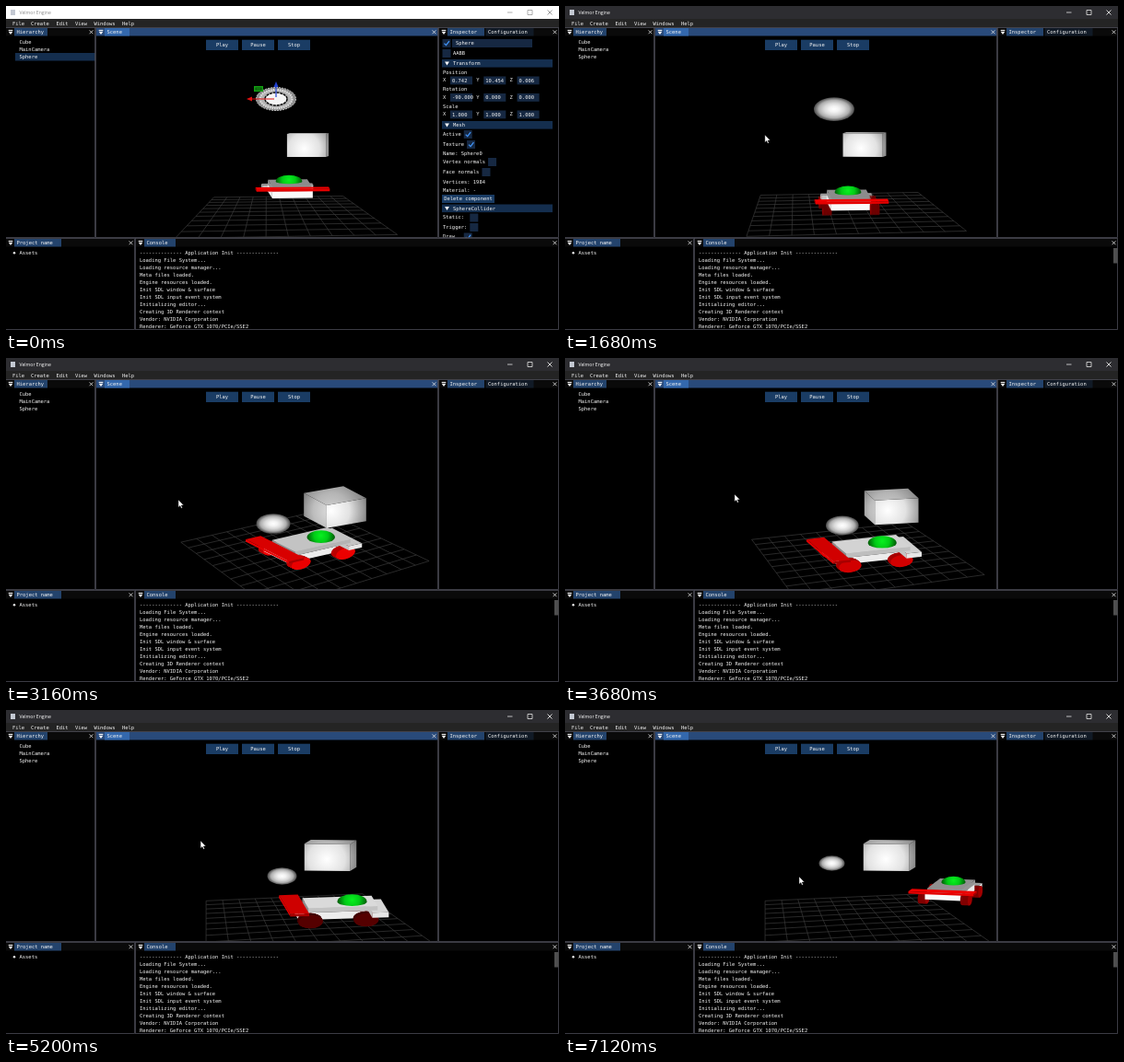
Write an HTML page with a canvas that moves like this. It is 600 by 352 pixels and loops after 7.16 s.

```html
<!DOCTYPE html>
<html lang="en">
<head>
<meta charset="utf-8">
<title>Velmor Engine</title>
<style>
html, body { margin: 0; width: 100%; height: 100%; overflow: hidden; background: #000; }
svg, canvas { position: absolute; left: 0; top: 0; width: 600px; height: 352px; }
text { font: 5.46px "DejaVu Sans Mono", monospace; fill: #f4f4f4; white-space: pre; }
.sans { font: 5.1px "Open Sans", sans-serif; }
</style>
</head>
<body>
<svg id="ui" viewBox="0 0 600 352"></svg>
<canvas id="view"></canvas>
<script>
const LOOP = 7160, FOCUS = 640, PLAY = 1000;
const BUTTON = '#1a3c64', HEADER = '#142e4e', FIELD = '#162842';

// ---------- editor panels ----------
const box = (x, y, w, h, c) => `<rect x="${x}" y="${y}" width="${w}" height="${h}" fill="${c}"/>`;
const line = (d, c, w = 0.8) => `<path d="${d}" fill="none" stroke="${c}" stroke-width="${w}"/>`;
const label = (x, mid, s, extra = '') => `<text x="${x}" y="${mid + 1.9}" ${extra}>${s}</text>`;
const centred = (x, mid, s) => label(x, mid, s, 'text-anchor="middle"');
const cross = (x, y, r = 1.9, c = '#eee') =>
  line(`M${x - r} ${y - r}l${2 * r} ${2 * r}m0 ${-2 * r}l${-2 * r} ${2 * r}`, c);
const arrow = (x, y) => `<path d="M${x - 2.4} ${y - 1.6}h4.8l-2.4 4z" fill="#fff"/>`;
const dock = (x, y) => box(x - 2.3, y - 2.6, 4.6, 1, '#fff') +
  `<path d="M${x - 2.3} ${y - 0.8}h4.6l-2.3 3.2z" fill="#fff"/>`;
const button = (x, y, w, h, s) => box(x, y, w, h, BUTTON) + centred(x + w / 2, y + h / 2, s);
const check = (x, y, on) => box(x, y, 9, 9, FIELD) +
  (on ? line(`M${x + 2} ${y + 4.6}l2 2l3.4 -4.4`, '#4296fa', 1.3) : '');
const header = (y, s) => box(473, y, 120, 8.6, HEADER) + arrow(478.5, y + 4) + label(485, y + 4.3, s);
const option = (mid, s, on) =>
  label(474, mid, s) + check(477 + s.length * 3.29, mid - 4, on);

function titleBar(bg, fg) {
  return box(0, 0, 600, 14, bg) + box(5, 4, 5, 6, '#c3c8d2') +
    `<text class="sans" x="14.5" y="9" style="fill:${fg}">Velmor Engine</text>` +
    line('M544 7h5.5M566 4.5h5v5h-5z', fg, 0.7) + cross(590, 7, 2.5, fg);
}

function panel(x, y, w, h, tab, tabW, bar = '#0a0a0a', tabColor = '#23436c') {
  return box(x, y, w, 8.5, bar) + box(x + 9, y, tabW, 8.5, tabColor) +
    dock(x + 5, y + 4.5) + label(x + 11.5, y + 4.3, tab) + cross(x + w - 4.5, y + 4.3) +
    `<rect x="${x - 0.5}" y="${y - 0.5}" width="${w}" height="${h}" fill="none" stroke="#4a4a54" stroke-width=".8"/>`;
}

function vector(y, name, values) {
  return label(474, y - 9, name) + values.map((v, i) => {
    const x = 474 + i * 36.3;
    return label(x, y - 0.5, 'XYZ'[i]) + box(x + 8, y - 4.5, 24, 8.8, FIELD) + label(x + 10, y, v);
  }).join('');
}

const log = `-------------- Application Init --------------
Loading File System...
Loading resource manager...
Meta files loaded.
Engine resources loaded.
Init SDL window &amp; surface
Init SDL input event system
Initializing editor...
Creating 3D Renderer context
Vendor: NVIDIA Corporation
Renderer: GeForce GTX 1070/PCIe/SSE2`.split('\n');

const inspector = check(473.5, 36, true) + box(484, 36, 87, 9, FIELD) + label(488, 40.5, 'Sphere') +
  check(473.5, 47, false) + label(485, 51.5, 'AABB') +
  header(58, 'Transform') +
  vector(81, 'Position', ['0.742', '10.454', '0.006']) +
  vector(99.5, 'Rotation', ['-90.000', '0.000', '0.000']) +
  vector(118, 'Scale', ['1.000', '1.000', '1.000']) +
  header(125, 'Mesh') +
  option(139, 'Active', true) + option(150, 'Texture', true) +
  label(474, 160, 'Name: Sphere0') +
  option(169, 'Vertex normals', false) + option(180, 'Face normals', false) +
  label(474, 191, 'Vertices: 1984') + label(474, 200, 'Material: -') +
  button(473, 205, 57, 9, 'Delete component') +
  header(215.5, 'SphereCollider') +
  option(229.5, 'Static: ', false) + option(240, 'Trigger:', false) + option(250.5, 'Draw  ', true) +
  box(471, 251.8, 128, 1.5, '#000');

document.getElementById('ui').innerHTML = box(0, 0, 600, 352, '#000') +
  `<g id="active">${titleBar('#2d2d31', '#fff')}</g><g id="idle">${titleBar('#fff', '#8a8a8a')}</g>` +
  box(0, 14, 600, 10, '#242424') +
  [[7, 'File'], [27, 'Create'], [54.5, 'Edit'], [75, 'View'], [95.5, 'Windows'], [126, 'Help']]
    .map(([x, s]) => label(x, 19, s)).join('') +
  `<g id="info">${inspector}${box(10, 51, 87, 8.5, HEADER)}</g>` +
  panel(0, 24, 97, 228, 'Hierarchy', 36) +
  panel(98, 24, 371, 228, 'Scene', 27, '#294a7a', '#3368ad') +
  panel(470, 24, 130, 228, 'Inspector', 40) +
  box(520.5, 24, 52, 8.5, '#111a26') + label(523, 28.3, 'Configuration') +
  panel(0, 253, 140, 99, 'Project name', 51) +
  panel(141, 253, 459, 99, 'Console', 34) +
  ['Cube', 'MainCamera', 'Sphere'].map((s, i) => label(14.5, 39.5 + i * 8, s)).join('') +
  '<circle cx="9" cy="268.3" r="1.2" fill="#fff"/>' + label(14.5, 268.3, 'Assets') +
  ['Play', 'Pause', 'Stop'].map((s, i) => button(217 + i * 39, 36.7, 35, 11.3, s)).join('') +
  log.map((s, i) => label(145, 268.4 + i * 8, s)).join('') +
  `<g id="thumb">${box(595, 263, 4.5, 16.5, '#4f4f4f')}</g>`;

// ---------- motion ----------
const clamp = v => Math.min(1, Math.max(0, v));
const mix = (a, b, k) => a + (b - a) * k;
const span = (t, from, to) => clamp((t - from) / (to - from));

// The camera rests in five poses; each swing between two of them has a start and an end.
const SWINGS = [[1000, 1640], [2560, 3160], [3160, 4360], [4360, 5100]];
const GRID = {
  x: [300, 307, 320, 320, 321], y: [223, 222, 210, 221.5, 226.5], size: [.87, .98, .95, .97, 1],
  yaw: [3, 5.5, 34, 2.5, 11], tilt: [.385, .36, .66, .43, .465], depth: [.0048, .003, .0027, .002, .0036]
};
const CUBE = {
  x: [327.5, 325, 357, 350.5, 352], y: [151, 150.5, 162, 161, 158], size: [.89, .91, 1.04, 1, 1.05],
  yaw: [-4, -5, 30, -8, -8], tilt: [.04, .05, .52, .18, .15]
};
const CAR = {
  x: [308, 308, 329, 330, 359.5], y: [211, 223, 214, 228, 228], size: [.9, .9, .95, 1, 1],
  yaw: [94, 94, 34, 1, 8], tilt: [.18, .23, .58, .42, .4], red: [0, 140, 235, 175, 85]
};

function pose(table, t) {
  const p = SWINGS.reduce((sum, s) => sum + span(t, ...s), 0), i = Math.min(3, Math.floor(p));
  return Object.fromEntries(Object.entries(table).map(([k, v]) => [k, mix(v[i], v[i + 1], p - i)]));
}

// The car steers away to the right after the last swing.
function carPose(t) {
  const car = pose(CAR, t), k = span(t, 5200, 7120);
  car.x += 59 * k;
  car.y -= 22 * k * k;
  car.yaw += 69 * k;
  car.size -= 0.18 * k;
  car.tilt -= 0.1 * k;
  car.red += 75 * k;
  return car;
}

// Paths: [time, x, y, radius]
const BALL = [[1000, 293, 101, 22], [1680, 292, 112, 22], [2560, 263, 166.5, 21.2],
  [3160, 290, 180, 18.5], [4360, 315, 184.5, 17], [5200, 299.5, 180.5, 16], [7120, 289.5, 166.5, 14]];
const POINTER = [[440, 250, 331], [960, 235, 43], [1680, 217, 140], [2000, 176, 147],
  [2560, 212.5, 141], [3160, 187, 154], [4360, 180, 140], [5200, 211, 142], [5800, 252, 165], [7120, 254, 181]];

function along(path, t) {
  const i = Math.max(1, path.findIndex(p => p[0] > t)), last = path[path.length - 1];
  if (t >= last[0]) return last.slice(1);
  const a = path[i - 1], b = path[i], k = span(t, a[0], b[0]);
  return a.slice(1).map((v, j) => mix(v, b[j + 1], k));
}

// ---------- scene ----------
const canvas = document.getElementById('view'), ctx = canvas.getContext('2d');
const ratio = window.devicePixelRatio || 1, STRETCH = 1.7;
canvas.width = 600 * ratio;
canvas.height = 352 * ratio;
const grey = v => `rgb(${v},${v},${v})`;

// Projects (length, width, height); width points at the viewer when yaw is 0.
function projector({ x, y, size, yaw, tilt, depth = 0 }) {
  const a = yaw * Math.PI / 180, cos = Math.cos(a), sin = Math.sin(a), lift = Math.sqrt(1 - tilt * tilt);
  const put = (l, w, h = 0) => {
    const near = w * cos - l * sin, s = size / (1 - depth * lift * near);
    return [x + STRETCH * s * (l * cos + w * sin), y + s * (near * tilt - h * lift)];
  };
  return { put, cos, sin, lift };
}

function poly(pts, fill) {
  ctx.beginPath();
  pts.forEach(p => ctx.lineTo(p[0], p[1]));
  ctx.closePath();
  ctx.fillStyle = fill;
  ctx.fill();
}

function block({ put, cos, sin }, l0, l1, half, h0, h1, top, side, end) {
  const w = cos > 0 ? half : -half, l = sin > 0 ? l0 : l1;
  poly([put(l, -half, h0), put(l, half, h0), put(l, half, h1), put(l, -half, h1)], end);
  poly([put(l0, w, h0), put(l1, w, h0), put(l1, w, h1), put(l0, w, h1)], side);
  poly([put(l0, -half, h1), put(l1, -half, h1), put(l1, half, h1), put(l0, half, h1)], top);
}

function glow(x, y, r, stops) {
  const g = ctx.createRadialGradient(x, y, 0, x, y, r);
  stops.forEach((c, i) => g.addColorStop(i / (stops.length - 1), c));
  return g;
}

function drawGrid(t) {
  const { put } = projector(pose(GRID, t));
  ctx.beginPath();
  for (let i = -60; i <= 60; i += 12) {
    ctx.moveTo(...put(i, -60)); ctx.lineTo(...put(i, 60));
    ctx.moveTo(...put(-60, i)); ctx.lineTo(...put(60, i));
  }
  ctx.strokeStyle = '#3c3c3c';
  ctx.lineWidth = 0.7;
  ctx.stroke();
}

function drawCube(t) {
  const c = pose(CUBE, t), light = (...stops) => glow(c.x - 4, c.y + 4, 38 * c.size, stops);
  block(projector(c), -14, 14, 14, -14, 14,
    light('#d0d0d0', '#b4b4b4', '#808080'), light('#fff', '#e2e2e2', '#858585'), light('#e0e0e0', '#bdbdbd', '#6c6c6c'));
}

function drawCar(t) {
  const car = carPose(t), view = projector(car), { put, cos, sin, lift } = view;
  const { size, tilt, red } = car;

  const wheel = (l, dir) => {
    if (red < 10) return;
    for (let i = 0; i <= 12; i++) {
      const [x, y] = put(l, 17 * dir + Math.sign(cos) * (i / 2 - 3), 7.5);
      ctx.save();
      ctx.transform(STRETCH * size * cos, -size * sin * tilt, 0, size * lift, x, y);
      ctx.beginPath();
      ctx.arc(0, 0, 7.8, 0, 7);
      ctx.restore();
      ctx.fillStyle = `rgb(${red * (i === 12 ? 1 : 0.8)},0,0)`;
      ctx.fill();
    }
  };
  const dome = () => {
    const [x, y] = put(9.5, 0, 21), r = 9.4 * STRETCH * size;
    ctx.beginPath();
    ctx.ellipse(x, y, r, 8 * size, 0, Math.PI, 2 * Math.PI);
    ctx.ellipse(x, y, r, size * (9.4 * tilt + 1), 0, 0, Math.PI);
    ctx.fillStyle = glow(x, y - 2, r, ['#08f020', '#00cc16', '#005a08']);
    ctx.fill();
  };

  const turned = sin * sin;
  const bumper = () => block(view, 20, 30.6, 18, 9, 15, grey(215 - 60 * turned), '#e6e6e6', '#c4c4c4');
  const behind = turned > 0.6;
  wheel(-20, -1);
  wheel(16, -1);
  if (behind) { bumper(); wheel(16, 1); }
  block(view, -27, 20, 14.4, 7.5, 16, '#a6a6a6', '#ececec', '#fafafa');
  if (!behind) { wheel(16, 1); bumper(); }
  block(view, -20.6, 24, 14, 16, 21, grey(220 - 80 * turned), grey(196 - 50 * turned), '#8c8c8c');
  dome();
  wheel(-20, 1);
  block(view, -34, -21.8, 26, 17, 20, `rgb(${205 + 35 * turned},0,0)`, '#a80000', '#e60000');
}

function drawBall(t) {
  const [x, y, r] = along(BALL, t);
  ctx.save();
  ctx.translate(x, y);
  ctx.scale(r, r * 0.585);
  ctx.beginPath();
  ctx.arc(0, 0, 1, 0, 7);
  ctx.fillStyle = glow(0, 0, 1, ['#fff', '#f2f2f2', '#d8d8d8', '#aeaeae', '#484848']);
  ctx.fill();
  ctx.restore();
}

function ring(x, y, rx, color, width, dash, fill) {
  ctx.beginPath();
  ctx.ellipse(x, y, rx, rx * 0.58, 0, 0, 2 * Math.PI);
  if (fill) { ctx.fillStyle = fill; ctx.fill(); }
  ctx.setLineDash(dash);
  ctx.strokeStyle = color;
  ctx.lineWidth = width;
  ctx.stroke();
  ctx.setLineDash([]);
}

function axis(x, y, dx, dy, color) {
  const n = Math.hypot(dx, dy), u = dx / n, v = dy / n, tx = x + dx, ty = y + dy;
  ctx.beginPath();
  ctx.moveTo(x, y);
  ctx.lineTo(tx - 5 * u, ty - 5 * v);
  ctx.strokeStyle = color;
  ctx.lineWidth = 1.2;
  ctx.stroke();
  poly([[tx, ty], [tx - 6 * u + 2.5 * v, ty - 6 * v - 2.5 * u], [tx - 6 * u - 2.5 * v, ty - 6 * v + 2.5 * u]], color);
}

function drawSelected() {
  const x = 293, y = 101;
  ring(x, y, 21.5, '#c4c4c4', 1, [2, 1], '#8f8f8f');
  ring(x, y, 17.5, '#e2e2e2', 2, [1.5, 1], '#b4b4b4');
  ring(x, y, 12, '#111', 1.6, [3, 0.8], '#f4f4f4');
  ring(x, y, 7, '#fff', 1, [1, 1]);
  ctx.fillStyle = '#12a012';
  ctx.fillRect(269, 87, 10, 6);
  ctx.strokeStyle = '#0a4a0a';
  ctx.strokeRect(271, 89, 6, 2);
  axis(x, 99, 0, -17, '#2040d0');
  axis(x - 2, y, -30, 0, '#e01010');
}

function drawPointer(t) {
  if (t < POINTER[0][0]) return;
  const [x, y] = along(POINTER, t);
  const shape = [[0, 0], [0, 8.2], [1.9, 6.5], [3.1, 9.3], [4.4, 8.7], [3.2, 6], [5.8, 5.9]];
  poly(shape.map(p => [x + p[0], y + p[1]]), '#fff');
  ctx.strokeStyle = '#000';
  ctx.lineWidth = 0.4;
  ctx.stroke();
}

const show = (id, on) => document.getElementById(id).setAttribute('visibility', on ? 'visible' : 'hidden');

function draw() {
  const t = performance.now() % LOOP;
  show('idle', t < FOCUS);
  show('active', t >= FOCUS);
  show('info', t < PLAY);
  show('thumb', t >= PLAY);

  ctx.setTransform(ratio, 0, 0, ratio, 0, 0);
  ctx.clearRect(0, 0, 600, 352);
  ctx.save();
  ctx.beginPath();
  ctx.rect(98, 49, 371, 202.5);
  ctx.clip();
  drawGrid(t);
  drawCar(t);
  drawCube(t);
  if (t < PLAY) drawSelected(); else drawBall(t);
  ctx.restore();
  drawPointer(t);
  requestAnimationFrame(draw);
}
draw();
</script>
</body>
</html>
```
